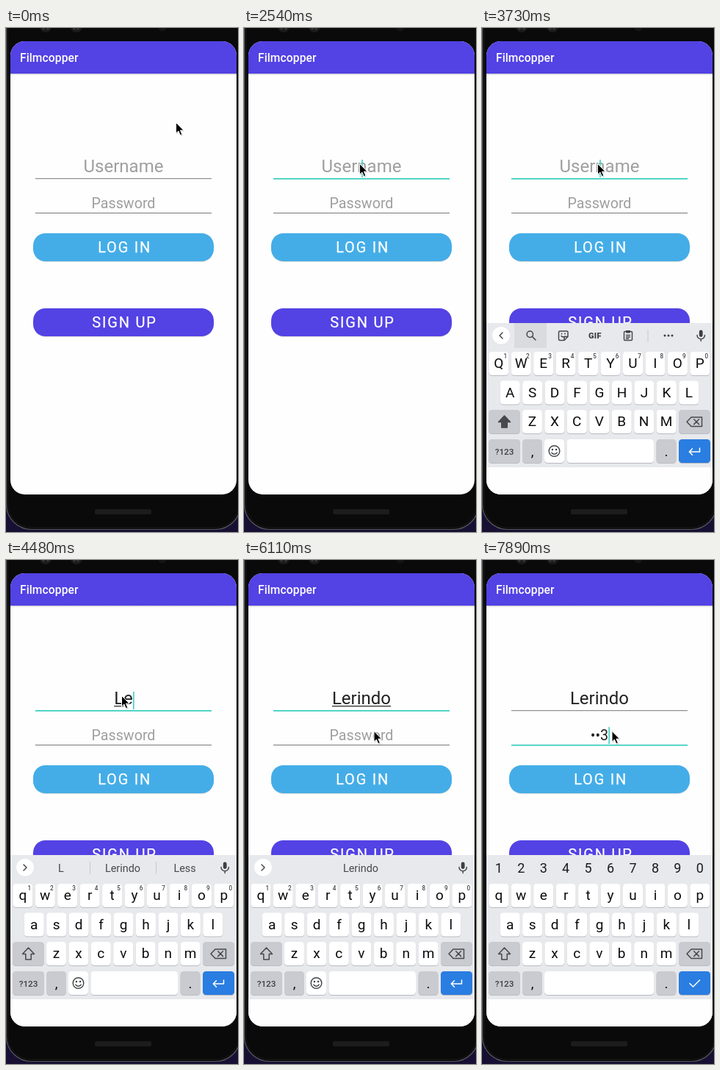
Animation, 316 px wide and 685 px high, one loop 8000 ms. Source, as an HTML page:

```html
<!DOCTYPE html>
<html lang="en">
<head>
<meta charset="utf-8">
<title>Login screen</title>
<style>
  html, body { margin: 0; width: 100%; height: 100%; overflow: hidden; background: #171033; }
  svg { display: block; width: 100vw; height: 100vh; font-family: Roboto, sans-serif; }
  text { text-anchor: middle; }
  .title { font-weight: 500; font-size: 15.6px; fill: #fff; text-anchor: start; letter-spacing: .1px; }
  .btn { font-size: 20px; letter-spacing: 1.8px; fill: #fff; stroke: #fff; stroke-width: .25; }
  .user { font-size: 24px; }
  .pass { font-size: 19.7px; }
  .hint { fill: #9f9f9f; }
  .typed { fill: #222; }
  .key { font-size: 19px; fill: #0c0c0e; }
  .num { font-size: 18px; fill: #1c1c1e; }
  .sup { font-size: 8.2px; font-weight: 500; fill: #45484c; }
  .sug { font-size: 14.4px; fill: #45484c; }
  .ico { fill: none; stroke: #45484c; stroke-width: 1.5; stroke-linecap: round; stroke-linejoin: round; }
  .ink { fill: #3c3f43; }
</style>
</head>
<body>
<svg viewBox="0 0 316 685">
  <defs>
    <clipPath id="screen"><rect x="6" y="18" width="308" height="616" rx="19.5"/></clipPath>
    <linearGradient id="fade" x1="0" y1="0" x2="0" y2="1">
      <stop offset="0" stop-color="#000" stop-opacity=".2"/>
      <stop offset="1" stop-color="#000" stop-opacity="0"/>
    </linearGradient>
  </defs>

  <!-- phone body -->
  <rect x=".5" y="-60" width="319" height="741.5" rx="34" fill="#0a0a0a" stroke="#58585d" stroke-width="1.2"/>
  <rect x="2.5" y="-60" width="315" height="739" rx="32" fill="none" stroke="#1a1a1c"/>
  <g fill="#1b1b1d">
    <circle cx="54" cy="-2" r="8"/><circle cx="96" cy="-2" r="8"/>
    <circle cx="213" cy="-1" r="5.5" fill="#151517"/>
  </g>
  <g fill="#38383b">
    <circle cx="51" cy="1" r="1.6"/><circle cx="57" cy="1" r="1.6"/>
    <circle cx="93" cy="1" r="1.6"/><circle cx="98" cy="1" r="1.6"/>
  </g>
  <rect x="121" y="654" width="77" height="7" rx="2" fill="#1c1c1d"/>

  <g clip-path="url(#screen)">
    <rect x="6" y="18" width="308" height="616" fill="#fefefe"/>
    <rect x="6" y="62" width="308" height="2.5" fill="url(#fade)"/>
    <rect x="6" y="18" width="308" height="44" fill="#5342e4"/>
    <text class="title" x="19" y="46">Filmcopper</text>

    <text id="userHint" class="user hint" x="160" y="196">Username</text>
    <text id="userText" class="user typed" x="160" y="196"></text>
    <rect id="compose" y="198" height="1.2" fill="#222"/>
    <rect id="userLine" x="40" width="240"/>
    <text id="passHint" class="pass hint" x="160" y="244.5">Password</text>
    <text id="passText" class="pass typed" x="160" y="244.5"></text>
    <rect id="passLine" x="40" width="240"/>
    <rect id="caret" width="1.6" fill="#3fd0c1"/>

    <g fill="#000" opacity=".14">
      <rect x="37.5" y="280" width="245" height="38" rx="16.5"/>
      <rect x="37.5" y="382" width="245" height="38" rx="16.5"/>
    </g>
    <rect x="37" y="279" width="246" height="38" rx="16.5" fill="#44ade8"/>
    <text class="btn" x="161.7" y="305">LOG IN</text>
    <rect x="37" y="381" width="246" height="38" rx="16.5" fill="#5342e4"/>
    <text class="btn" x="161.5" y="407">SIGN UP</text>

    <g id="board">
      <rect x="6" y="401" width="308" height="240" fill="#fefefe"/>
      <rect x="6" y="401" width="308" height="196" fill="#e8e9ec"/>

      <g id="strip">
        <circle cx="26" cy="418.6" r="12" fill="#000" opacity=".08"/>
        <circle cx="26" cy="418" r="12" fill="#fff"/>
        <path id="chevron" class="ico"/>
        <rect x="295.8" y="410.5" width="4.8" height="9.5" rx="2.4" class="ink"/>
        <path class="ico" d="M293 417.5a5.2 5.2 0 0 0 10.4 0M298.2 423v2.6"/>
      </g>

      <g id="tools">
        <rect x="44" y="401" width="44" height="34" fill="#d9dbde"/>
        <circle class="ico" cx="65.3" cy="416.3" r="4.2"/>
        <path class="ico" d="M68.6 419.6L73 424" stroke-width="2"/>
        <path class="ico" d="M106 412h9.5a1.5 1.5 0 0 1 1.5 1.5v6l-5 5h-6a1.5 1.5 0 0 1-1.5-1.5v-9.5a1.5 1.5 0 0 1 1.5-1.5M117 419.5h-3.5a1.5 1.5 0 0 0-1.5 1.5v3.5M108 418.5q2 2.5 5 .5"/>
        <circle class="ink" cx="108.5" cy="415.5" r=".9"/><circle class="ink" cx="113" cy="415.5" r=".9"/>
        <text class="ink" x="154" y="422" font-size="11" font-weight="800" letter-spacing=".4">GIF</text>
        <rect class="ico" x="193.5" y="412.5" width="11" height="12" rx="1.2"/>
        <rect class="ink" x="196" y="411" width="6" height="3.5" rx="1"/>
        <path class="ico" d="M196.5 417.5h5M196.5 420h5M196.5 422.3h3"/>
        <path d="M226 410v17" stroke="#c6c8cc"/>
        <g class="ink"><circle cx="249" cy="418" r="1.5"/><circle cx="254" cy="418" r="1.5"/><circle cx="259" cy="418" r="1.5"/></g>
      </g>

      <g id="suggest">
        <path id="bars" d="M114.5 410v17M204.5 410v17" stroke="#c6c8cc"/>
        <text class="sug" x="75" y="424"></text>
        <text class="sug" x="159" y="424"></text>
        <text class="sug" x="243.5" y="424"></text>
      </g>

      <g id="digits"></g>
      <g id="keys"></g>

      <path id="shift" class="ico" d="M30.5 527L38.5 535.5H34.2V543H26.800V535.5H22.5Z"/>
      <path class="ico" d="M285 529H299.5V541.500H285L279 535.2ZM288.700 531.800l6.800 6.800M295.500 531.800l-6.800 6.800"/>
      <text class="ink" x="30.5" y="579.5" font-size="11.7" font-weight="500">?123</text>
      <text class="key" x="68.5" y="582">,</text>
      <text class="key" x="251" y="582">.</text>
      <g id="smile">
        <circle class="ico" cx="98.5" cy="575" r="7.3"/>
        <circle class="ink" cx="95.9" cy="573" r="1.2"/><circle class="ink" cx="101.1" cy="573" r="1.2"/>
        <path class="ico" d="M94.800 577.200a4 3.200 0 0 0 7.400 0"/>
      </g>
      <path id="enter" class="ico" style="stroke:#fff" d="M296.500 571v5h-14M286.500 571.800L282.300 576L286.500 580.200"/>
      <path id="check" class="ico" style="stroke:#fff" d="M283 575.500L287.500 580L296.500 571"/>
    </g>
  </g>

  <g id="mouse">
    <path d="M.6 1.5V16L4.2 12.8L6.7 18.5L9.2 17.4L6.7 11.9H11.5Z" fill="#000" opacity=".2"/>
    <path d="M0 0V14.6L3.4 11.5L5.8 17.2L8.3 16.1L5.9 10.6H10.5Z" fill="#000" stroke="#fff"/>
  </g>
</svg>

<script>
const LOOP = 8000, PITCH = 30.45, NAME = "Lerindo";
const $ = id => document.getElementById(id);

function add(parent, tag, attrs, text = "") {
  const el = document.createElementNS("http://www.w3.org/2000/svg", tag);
  for (const k in attrs) el.setAttribute(k, attrs[k]);
  el.textContent = text;
  parent.appendChild(el);
  return el;
}
const set = (el, attrs) => { for (const k in attrs) el.setAttribute(k, attrs[k]); };
const show = (el, on) => { el.style.display = on ? "" : "none"; };

// keyboard
const keys = $("keys"), letters = [];
function cap(x, y, w, fill, h = 32) {
  add(keys, "rect", { x, y: y + 1, width: w, height: h, rx: 4.5, fill: "#b9bbc0" });
  return add(keys, "rect", { x, y, width: w, height: h, rx: 4.5, fill });
}
[["qwertyuiop", 22.8, 440], ["asdfghjkl", 38.2, 479.5], ["zxcvbnm", 68.4, 519]].forEach(([row, x0, y], r) => {
  [...row].forEach((ch, i) => {
    const x = x0 + i * PITCH;
    cap(x - 13.5, y, 27, "#fff");
    letters.push(add(keys, "text", { class: "key", x, y: y + 22.2 }, ch));
    if (r) return;
    const digit = (i + 1) % 10;
    add(keys, "text", { class: "sup", x: x + 9, y: y + 9 }, digit);
    add($("digits"), "text", { class: "num", x, y: 425 }, digit);
  });
});
const GREY = "#c9cbd0";
cap(9, 519, 43, GREY);
cap(268, 519, 43, GREY);
cap(9, 559, 43, GREY);
cap(55, 559, 27, GREY);
const emojiKey = cap(85, 559, 27, "#fff");
const emojiEdge = emojiKey.previousSibling;
const space = cap(115.5, 559, 118.5, "#fff");
const spaceEdge = space.previousSibling;
cap(237.5, 559, 27, GREY);
cap(268, 559, 43, "#2a7de1");

// each track: [start ms, ...values], held until the next entry
const mousePath = [
  [0, 231.5, 128.5], [750, 225, 140], [900, 212, 160], [1050, 200, 178], [1200, 194, 187],
  [1800, 181, 192], [1950, 165, 189], [2100, 157.5, 184.5],
  [5660, 161, 195], [5810, 168, 212], [5960, 174, 227], [6110, 177, 232.5]
];
const caretOn = [[0, 0], [2540, 1], [2990, 0], [3430, 1], [5810, 0], [6400, 1], [6850, 0], [7150, 1]];
const focus = [[0, ""], [2390, "user"], [6260, "pass"]];
const panel = [[0, ""], [2990, "tools"], [4180, "suggest"], [6550, "digits"]];
// letters typed, letters underlined and suggested
const typing = [
  [0, 0, 0], [3880, 1, 0], [4180, 1, 1], [4480, 2, 1], [4630, 2, 2], [4770, 3, 2],
  [4920, 4, 3], [5070, 5, 4], [5220, 6, 5], [5360, 7, 6], [5660, 7, 7]
];
const secret = [[0, ""], [7150, "1"], [7440, "•2"], [7890, "••3"]];

const at = (track, t) => track.filter(s => s[0] <= t).pop().slice(1);

function line(el, y, on) {
  set(el, { y: on ? y : y + .2, height: on ? 1.8 : 1, fill: on ? "#3fd0c1" : "#777" });
}

function draw(t) {
  const [mx, my] = at(mousePath, t);
  $("mouse").setAttribute("transform", `translate(${mx} ${my})`);

  // fields
  const [active] = at(focus, t), [typed, marked] = at(typing, t), [pw] = at(secret, t);
  const user = $("userText"), pass = $("passText");
  user.textContent = NAME.slice(0, typed);
  pass.textContent = pw;
  show($("userHint"), !typed);
  show($("passHint"), !pw);
  line($("userLine"), 204, active === "user");
  line($("passLine"), 250.8, active === "pass");

  const width = typed ? user.getComputedTextLength() : 0;
  const composing = marked > 0 && active === "user";
  show($("compose"), composing);
  if (composing) set($("compose"), { x: 160 - width / 2, width: user.getSubStringLength(0, marked) });

  const inPass = active === "pass";
  const half = (inPass ? (pw ? pass.getComputedTextLength() : 0) : width) / 2;
  show($("caret"), at(caretOn, t)[0]);
  set($("caret"), { x: 160.2 + half, y: inPass ? 227 : 179, height: inPass ? 23 : 24 });

  // keyboard
  const [mode] = at(panel, t), caps = t >= 3730 && t < 3880, num = mode === "digits";
  show($("board"), mode);
  $("board").setAttribute("transform", `translate(0 ${t < 3140 ? 4 : 0})`);
  for (const id of ["tools", "suggest", "digits"]) show($(id), mode === id);
  show($("strip"), !num);
  $("chevron").setAttribute("d", mode === "suggest" ? "M24 414L28 418L24 422" : "M28 414L24 418L28 422");
  for (const l of letters) l.textContent = caps ? l.textContent.toUpperCase() : l.textContent.toLowerCase();
  for (const l of keys.querySelectorAll(".sup")) show(l, !num);
  $("shift").style.fill = caps ? "#45484c" : "none";

  const done = marked === NAME.length;
  const words = done ? ["", NAME, ""] : [NAME.slice(0, marked), NAME, "Less"];
  document.querySelectorAll(".sug").forEach((el, i) => { el.textContent = words[i]; });
  show($("bars"), !done);

  for (const el of [emojiKey, emojiEdge, $("smile")]) show(el, !num);
  for (const el of [space, spaceEdge]) set(el, num ? { x: 85, width: 149 } : { x: 115.5, width: 118.5 });
  show($("enter"), !num);
  show($("check"), num);
}

const start = performance.now();
function tick() {
  draw((performance.now() - start) % LOOP);
  requestAnimationFrame(tick);
}
tick();
</script>
</body>
</html>
```
